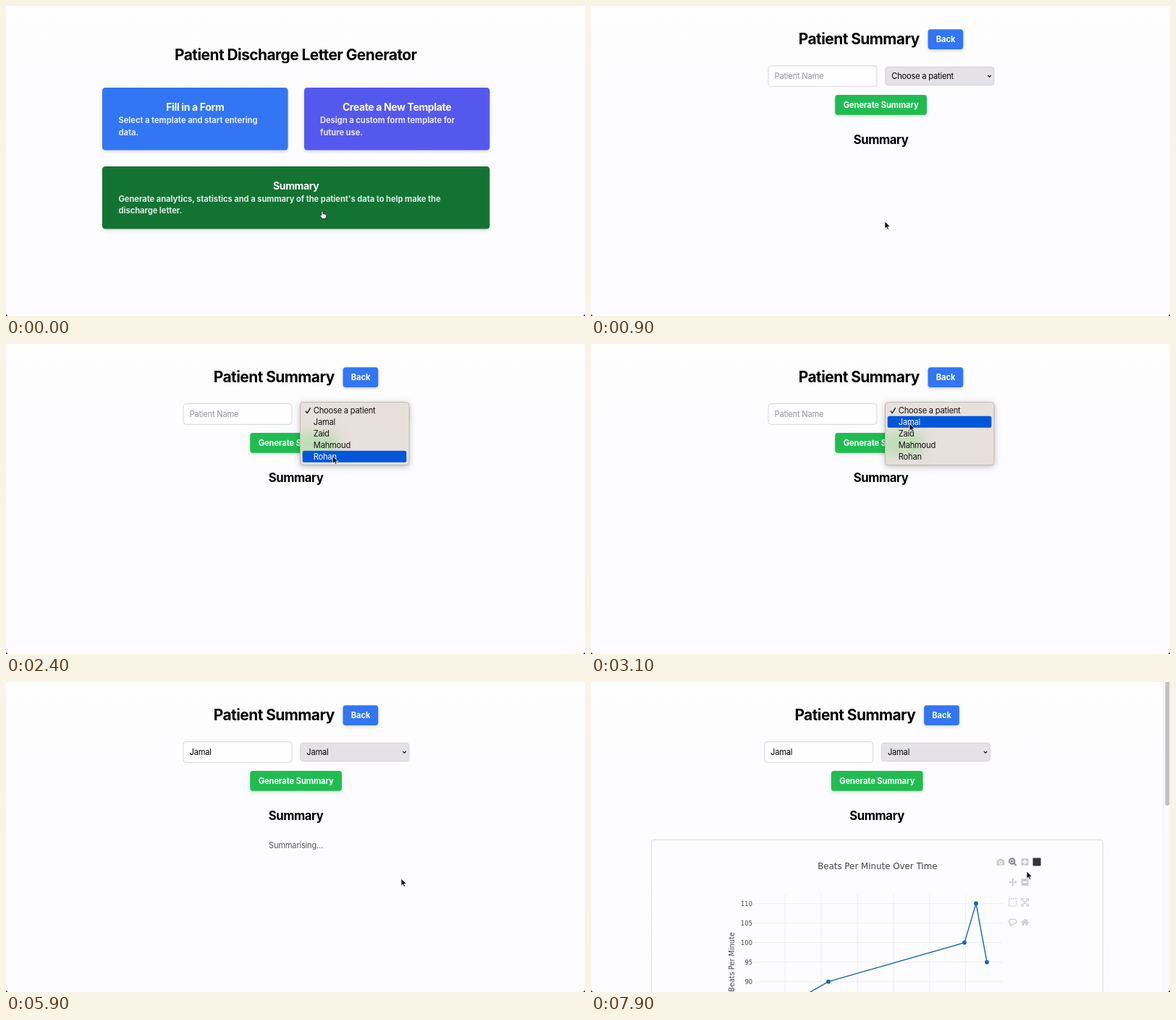
Animation, 800 px wide and 429 px high, one loop 8 s. Source, as an HTML page:

```html
<!DOCTYPE html>
<html lang="en">
<head>
<meta charset="utf-8">
<title>Patient Discharge Letter Generator</title>
<style>
  html, body { margin: 0; width: 100%; height: 100%; overflow: hidden; background: #fdfcfe; }
  svg { display: block; width: 100vw; height: 100vh; }
  text { font: 11.15px Inter, sans-serif; font-optical-sizing: none; letter-spacing: -.02em; white-space: pre; }
  .mid { text-anchor: middle; }
  .h1, .h2, .h3 { font-weight: 700; letter-spacing: -.026em; }
  .h1 { font-size: 20.9px; }
  .h2 { font-size: 16.7px; }
  .h3 { font-size: 14px; fill: #fff; }
  .bold { font-weight: 700; letter-spacing: -.006em; fill: #fff; }
  .desc { font-weight: 700; letter-spacing: -.004em; fill: #fff; opacity: .85; }
  .status { font-size: 7.8px; letter-spacing: 0; fill: #333; }
  .shadow { filter: drop-shadow(0 2px 2px rgba(0, 0, 0, .14)); }
  .chart text { font-family: "DejaVu Sans", Verdana, sans-serif; letter-spacing: 0; fill: #444; }
  .chart .title { font-size: 11.85px; }
  .chart .axis { font-size: 9.76px; }
  .chart .tick { font-size: 8.36px; text-anchor: end; }
  .bar { fill: none; stroke: #cdcdcf; stroke-width: 1.4; }
  .bar .solid { fill: #cdcdcf; stroke: none; }
</style>
</head>
<body>
<svg viewBox="0 0 800 429" preserveAspectRatio="none">
  <defs>
    <linearGradient id="bg" x2="0" y2="1">
      <stop stop-color="#fefefe"/><stop offset=".3" stop-color="#fdfcfe"/><stop offset="1" stop-color="#fcfbfe"/>
    </linearGradient>
    <filter id="blur" x="-50%" y="-80%" width="200%" height="260%"><feGaussianBlur stdDeviation="8"/></filter>
    <clipPath id="menuClip"><rect x="406.5" y="80.5" width="150.5" height="87" rx="4"/></clipPath>
  </defs>
  <rect width="800" height="429" fill="url(#bg)"/>

  <g id="home">
    <text class="h1 mid" x="400.3" y="75.3">Patient Discharge Letter Generator</text>
    <g class="shadow">
      <rect x="133" y="113" width="256.6" height="86.5" rx="4.3" fill="#3276f4"/>
      <rect x="412" y="113" width="256.3" height="86.5" rx="4.3" fill="#5558ec"/>
      <rect x="133" y="222" width="535.3" height="86.5" rx="4.3" fill="#137333"/>
    </g>
    <text class="h3 mid" x="261.3" y="145">Fill in a Form</text>
    <text class="desc" x="155.5" y="162">Select a template and start entering</text>
    <text class="desc" x="155.5" y="178.7">data.</text>
    <text class="h3 mid" x="540" y="145">Create a New Template</text>
    <text class="desc" x="434" y="162">Design a custom form template for</text>
    <text class="desc" x="434" y="178.7">future use.</text>
    <text class="h3 mid" x="400.7" y="253.6">Summary</text>
    <text class="desc" x="155.5" y="270.7">Generate analytics, statistics and a summary of the patient's data to help make the</text>
    <text class="desc" x="155.5" y="287.4">discharge letter.</text>
    <g id="status">
      <path d="M0 418H92Q94.5 418 94.5 420.5V429H0Z" fill="#f4f3f5" stroke="#d3d2d5" stroke-width=".8"/>
      <text class="status" x="2.3" y="427">localhost:5174/summary</text>
    </g>
  </g>

  <g id="page">
    <text class="h1" x="286.8" y="53">Patient Summary</text>
    <rect class="shadow" x="465.5" y="32.3" width="48.8" height="27.7" rx="4" fill="#3276f4"/>
    <text class="bold mid" x="490" y="50.2">Back</text>
    <rect x="245" y="82.7" width="150" height="28.6" rx="4" fill="#fefdff" stroke="#d2d3d9" stroke-width=".9"/>
    <text id="nameText" x="253.5" y="101.2"></text>
    <rect x="406.7" y="84.3" width="150.2" height="25.4" rx="4" fill="#e4e2e7" stroke="#d0cfd6" stroke-width=".9"/>
    <text id="pickText" x="415.3" y="101.2"></text>
    <path d="M548.3 96l2.2 2.2 2.2-2.2" fill="none" stroke="#111" stroke-width="1.2"/>
    <rect id="button" class="shadow" x="337.2" y="123" width="126.8" height="27.8" rx="4"/>
    <text class="bold mid" x="400.7" y="141.1">Generate Summary</text>
    <text class="h2 mid" x="400.5" y="190.5">Summary</text>
    <text id="busy" class="mid" x="400.5" y="230.2" fill="#56585f">Summarising...</text>
    <rect id="card" x="89.1" y="218.2" width="623.6" rx="4" fill="#fdfcfe" stroke="#d5d5da" stroke-width=".9"/>
  </g>

  <g id="menu">
    <rect x="406.5" y="80.5" width="150.5" height="87" rx="4" fill="#e8e0db" stroke="#b5b0ae" stroke-width=".8"
      style="filter:drop-shadow(0 2px 4px rgba(0,0,0,.25))"/>
    <g clip-path="url(#menuClip)">
      <rect x="400" y="123" width="58" height="30" fill="#b5dcae" opacity=".85" filter="url(#blur)"/>
    </g>
    <rect id="hilite" x="409.7" width="143.6" height="16" rx="2.6" fill="#0256da"/>
    <path id="check" d="M413.8 92.6l2.5 3 4.3-7.2" fill="none" stroke-width="1.3"/>
    <g id="options"></g>
  </g>

  <g id="chart" class="chart">
    <text class="title mid" x="395.8" y="258.7">Beats Per Minute Over Time</text>
    <path id="grid" stroke="#ececee" stroke-width=".9"/>
    <g id="ticks"></g>
    <text class="axis mid" transform="translate(198 387.5) rotate(-90)">Beats Per Minute</text>
    <g id="series" fill="#1668b3"></g>
    <g class="bar">
      <path class="solid" fill-rule="evenodd" d="M560.5 246.2h2.6l1-1.7h4l1 1.7h2.4v7.6h-11zM566 247.4a2.5 2.5 0 1 0 .01 0z"/>
      <circle cx="566" cy="249.9" r="1.3" class="solid"/>
      <g stroke="#808083" stroke-width="1.9">
        <circle cx="581.7" cy="248" r="3.7"/><path d="M584.5 250.8l3.2 3.2M580 248h3.4M581.7 246.3v3.4" stroke-width="1.7"/>
      </g>
      <rect class="solid" x="594.5" y="244" width="10" height="10" rx="1"/>
      <rect class="solid" x="594.5" y="272" width="10" height="10" rx="1"/>
      <path d="M596.3 249h6.4M599.5 245.8v6.4M596.3 277h6.4" stroke="#fdfcfe" stroke-width="1.8"/>
      <rect x="610.5" y="243.5" width="11" height="11" rx="1" fill="#333338" stroke="none"/>
      <path d="M578 277h9.4M582.7 272.3v9.4"/>
      <path class="solid" d="M576.8 277l2.4-2v4zM588.6 277l-2.4-2v4zM582.7 271.1l-2 2.4h4zM582.7 282.9l-2-2.4h4z"/>
      <rect x="577.6" y="300" width="10.2" height="10" stroke-dasharray="1.7 1"/>
      <path d="M594.8 303v-3h3M601.4 300h3v3M604.4 307v3h-3M597.8 310h-3v-3M596.4 301.8l6.4 6.4M602.8 301.8l-6.4 6.4"/>
      <path d="M579.5 334.5C575.5 332 578 328 582.7 328S589.5 331 587 333.6 581 336 579.6 334.4Q577.6 337 581 337.6"/>
      <path class="solid" d="M593.8 333l5.7-5.3 2.2 2v-1.4h1.6v2.9l1.9 1.8-.9 1-4.8-4.4-4.8 4.4z"/>
      <path class="solid" d="M595.7 333.5l3.8-3.5 3.8 3.5v3.5h-2.7v-2.8h-2.2v2.8h-2.7z"/>
    </g>
    <rect x="790.5" width="9.5" height="429" fill="#fafafa"/>
    <path d="M790.8 0V429" stroke="#e6e6e8" stroke-width=".8"/>
    <rect x="793.4" y="-4" width="5.8" height="175" rx="2.9" fill="#c1c1c3"/>
  </g>

  <path d="M0 425.5Q.4 428.6 3.5 429H0ZM800 425.5Q799.6 428.6 796.5 429H800Z" fill="#111"/>
  <path id="arrow" d="M0 0V10.2L2.4 8 3.9 11.6 5.6 10.9 4.1 7.4H7.3Z" fill="#000" stroke="#fff" stroke-width=".8"/>
  <path id="hand" d="M-1.2.9C-1.2-.4 1-.4 1 .9V4C1.5 3.4 2.6 3.5 2.8 4.2 3.4 3.7 4.4 4 4.5 4.7 5.2 4.4 5.8 4.9 5.8 5.6 5.8 7.5 5.2 8.3 4.8 9.2V10.6H-.6V9.6C-1.5 8.6-2.8 7.2-3.2 6-3.3 5-2.3 4.9-1.2 6Z"
    fill="#fff" stroke="#111" stroke-width=".8"/>
</svg>
<script>
const LOOP = 8000, STEP = 100;
const AT = { status: 100, page: 900, open: 1600, close: 3400, busy: 4400, card: 7400, chart: 7600 };
const OPTIONS = ['Choose a patient', 'Jamal', 'Zaid', 'Mahmoud', 'Rohan'];
const ROW_TOP = 84, ROW = 16;

// time, x, y of the pointer tip
const MOVES = [
  [0, 437, 284], [600, 405.5, 292.5], [900, 406, 298], [1000, 406, 298], [1500, 460, 92.5],
  [1800, 460, 92.5], [2500, 451, 159], [2800, 450, 163], [3100, 440, 110], [3500, 440, 108],
  [4000, 376.5, 135.3], [4500, 378, 137], [5100, 442, 272], [5300, 442, 272],
  [5600, 546, 272], [5900, 546, 272], [6200, 600, 264], [6600, 600, 264], [7500, 602, 262]
];

const $ = id => document.getElementById(id);
const show = (id, on) => { $(id).style.display = on ? '' : 'none'; };
const set = (id, attrs) => { for (const k in attrs) $(id).setAttribute(k, attrs[k]); };

function pointer(t) {
  const i = MOVES.findIndex(m => m[0] > t);
  if (i < 0) return MOVES[MOVES.length - 1].slice(1);
  const [t0, x0, y0] = MOVES[i - 1], [t1, x1, y1] = MOVES[i];
  const p = (t - t0) / (t1 - t0), e = p * p * (3 - 2 * p);
  return [x0 + (x1 - x0) * e, y0 + (y1 - y0) * e];
}

function build() {
  $('options').innerHTML = OPTIONS.map((name, i) =>
    `<text x="424.8" y="${96.2 + i * ROW}">${name}</text>`).join('');

  const points = [[290, 436.5], [328, 414.7], [516, 360.7], [532, 306.5], [547, 387.7]];
  $('series').innerHTML =
    `<polyline points="${points.join(' ')}" fill="none" stroke="#1668b3" stroke-width="1.4"/>` +
    points.slice(1).map(([x, y]) => `<circle cx="${x}" cy="${y}" r="2.9"/>`).join('');

  let grid = '', ticks = '';
  for (let i = 0; i < 6; i++) grid += `M${268.3 + i * 49.85} 294V429`;
  for (let i = 0; i < 5; i++) {
    const y = 306.5 + i * 27.05;
    grid += `M224.5 ${y}H568`;
    ticks += `<text class="tick" x="223" y="${y + 3}">${110 - i * 5}</text>`;
  }
  set('grid', { d: grid });
  $('ticks').innerHTML = ticks;
}

function render(t) {
  const [x, y] = pointer(t);
  const onPage = t >= AT.page, open = t >= AT.open && t < AT.close;
  const picked = t >= AT.close, charted = t >= AT.chart;

  show('home', !onPage);
  show('status', t >= AT.status);
  show('page', onPage);
  show('menu', open);
  show('busy', t >= AT.busy && t < AT.card);
  show('card', t >= AT.card);
  show('chart', charted);

  set('page', { transform: `translate(${charted ? -5.4 : 0} 0)` });
  set('card', { height: charted ? 240 : 145.5 });
  $('nameText').textContent = picked ? OPTIONS[1] : 'Patient Name';
  set('nameText', { fill: picked ? '#000' : '#9296a0' });
  $('pickText').textContent = OPTIONS[picked ? 1 : 0];

  const row = Math.max(0, Math.min(4, Math.floor((y - ROW_TOP) / ROW)));
  set('hilite', { y: ROW_TOP - .2 + row * ROW });
  set('check', { stroke: row ? '#111' : '#fff' });
  [...$('options').children].forEach((el, i) => el.setAttribute('fill', i === row ? '#fff' : '#111'));

  const hover = onPage && !open && x > 337 && x < 464 && y > 123 && y < 151;
  set('button', { fill: hover ? '#137333' : '#1fbd51' });

  const hand = !onPage || hover;
  show('hand', hand);
  show('arrow', !hand);
  set(hand ? 'hand' : 'arrow', { transform: `translate(${x} ${y})` });
}

function tick() {
  render(Math.floor(performance.now() % LOOP / STEP) * STEP);
  requestAnimationFrame(tick);
}

build();
tick();
</script>
</body>
</html>
```
